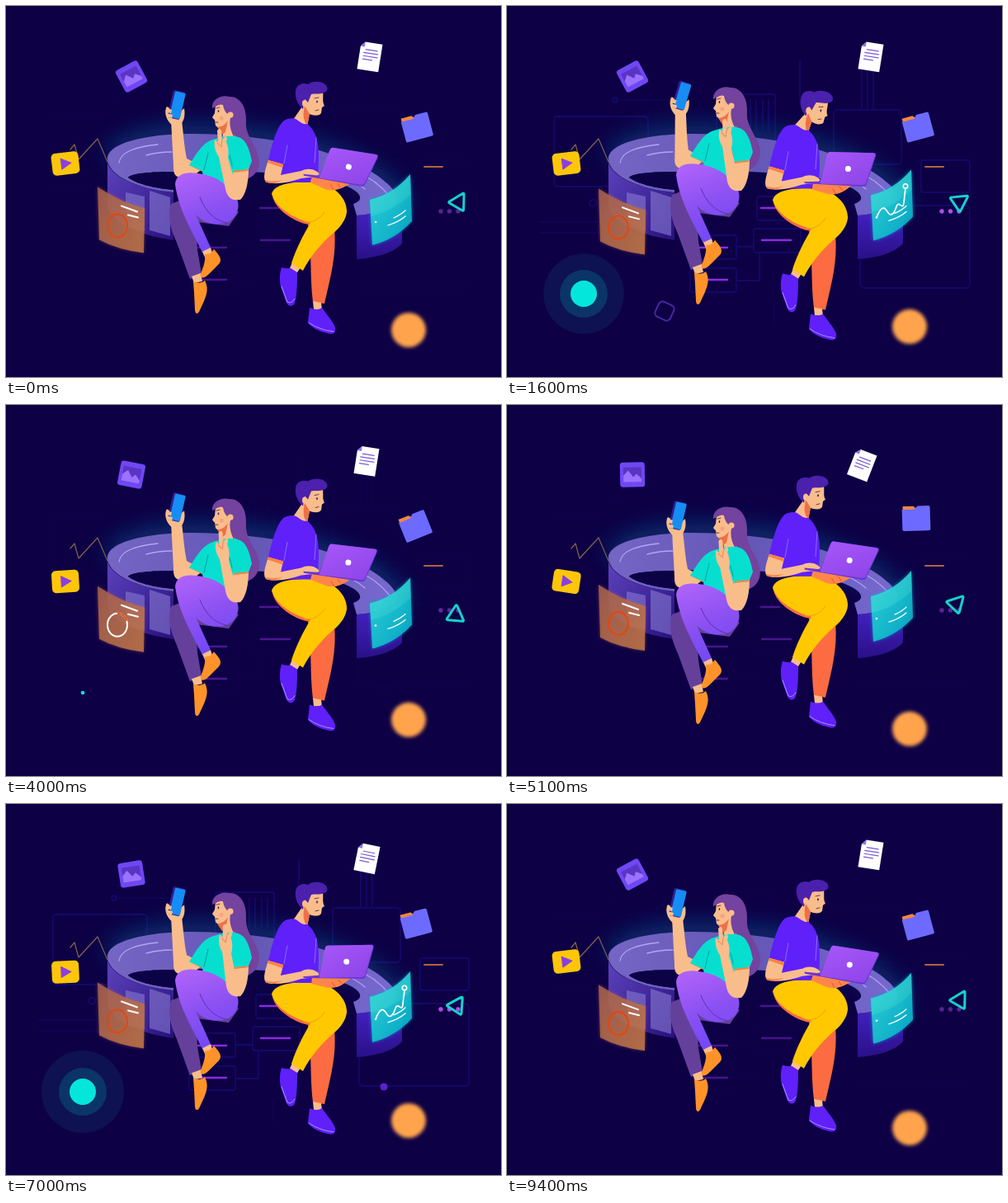
Recreate the animation shown at these times as an HTML page. Size 600 by 450 pixels, loop 9.5 s.

```html
<!DOCTYPE html>
<html lang="en">
<head>
<meta charset="utf-8">
<style>
html, body { margin: 0; height: 100%; overflow: hidden; background: #0d0045; }
svg { display: block; width: 100vw; height: 100vh; }
.line { fill: none; stroke-linecap: round; stroke-linejoin: round; }
.skin { fill: #f9bd8c; }
.shoe { fill: #ff9329; }
.boot { fill: #5f20fa; }
</style>
</head>
<body>
<svg viewBox="0 0 600 450">
<defs>
  <linearGradient id="wall" x2="1" y2="1"><stop stop-color="#5c43bd"/><stop offset="1" stop-color="#29107d"/></linearGradient>
  <linearGradient id="wallRight" x2="0" y2="1"><stop stop-color="#4a25d0"/><stop offset="1" stop-color="#2a1088"/></linearGradient>
  <linearGradient id="top"><stop stop-color="#7565c4"/><stop offset=".5" stop-color="#6457b5"/><stop offset="1" stop-color="#7769cf"/></linearGradient>
  <linearGradient id="thigh" x2=".3" y2="1"><stop stop-color="#b364fa"/><stop offset=".6" stop-color="#8a50f2"/><stop offset="1" stop-color="#7449f6"/></linearGradient>
  <linearGradient id="lid" x2="1" y2="1"><stop stop-color="#a857fa"/><stop offset="1" stop-color="#8c44e6"/></linearGradient>
  <linearGradient id="mint" x2="1" y2="1"><stop stop-color="#2fdcd4"/><stop offset="1" stop-color="#04abc6"/></linearGradient>
  <linearGradient id="rust" x2="1" y2="1"><stop stop-color="#a4604f"/><stop offset="1" stop-color="#c27747"/></linearGradient>
  <filter id="soft" x="-50%" y="-50%" width="200%" height="200%"><feGaussianBlur stdDeviation="2"/></filter>
  <filter id="halo" x="-50%" y="-50%" width="200%" height="200%"><feGaussianBlur stdDeviation="14"/></filter>
</defs>
<rect width="600" height="450" fill="#0d0045"/>

<g id="circuit" class="line" stroke="#130868" stroke-width="1.8">
  <rect x="57" y="134" width="114" height="85" rx="4"/>
  <rect x="396" y="126" width="82" height="66" rx="4"/>
  <rect x="428" y="242" width="133" height="100" rx="5"/>
  <rect x="502" y="187" width="59" height="39" rx="3"/>
  <rect x="254" y="107" width="71" height="62" rx="3"/>
  <rect x="303" y="231" width="47" height="29" rx="3"/>
  <rect x="299" y="270" width="57" height="29" rx="3"/>
  <rect x="222" y="278" width="56" height="29" rx="3"/>
  <rect x="222" y="318" width="56" height="29" rx="3"/>
  <path d="M278 333H306V299M278 292H299M430 78V126M437 78V126M444 78V126M355 67V118M295 114V150M302 114V150M310 114V150M317 114V150"/>
  <path d="M131 114H200M40 262H110M40 275H112M324 360V385" opacity=".5"/>
  <circle cx="131" cy="114" r="3"/><circle cx="104" cy="239" r="4"/>
</g>
<g id="bars" class="line" stroke="#8a2be0" stroke-width="2.4">
  <path d="M308 245H330M309 284H344M233 293H267M233 332H267"/>
  <path d="M527 249h0M537.5 249h0M548 249h0" stroke="#b04be8" stroke-width="5.4"/>
</g>
<path class="line" d="M507 195H529" stroke="#b4633e" stroke-width="2"/>
<path class="line" d="M78 174L83 168L88 186L111 161L123 189H141" stroke="#87634c" stroke-width="1.2"/>

<circle id="ringOuter" cx="93" cy="349" fill="#0e1152"/>
<circle id="ringInner" cx="93" cy="349" fill="#0b3468"/>
<circle id="core" cx="93" cy="349" fill="#04e6dc"/>
<circle id="dot" cx="458" cy="343" r="4.5" fill="#5a24c8"/>
<rect id="tile" x="-10" y="-10" width="20" height="20" rx="5" fill="none" stroke="#4c279f" stroke-width="2"/>
<circle id="ball" cx="488" r="21" fill="#ffa44e" filter="url(#soft)"/>

<path class="line" d="M135 178C180 150 240 154 310 162C390 172 455 205 474 236" stroke="#0f5290" stroke-width="24" opacity=".65" filter="url(#halo)"/>
<path d="M123 188C124 206 160 222 203 226V284C160 278 124 262 123 240Z" fill="url(#wall)"/>
<path d="M145 226L168 231V273L145 267ZM174 224L199 232V279L174 272Z" fill="#8273ce" opacity=".65"/>
<path d="M425 254C450 252 478 246 480 234V288C470 300 445 306 425 307Z" fill="url(#wallRight)"/>
<path d="M203 226C160 222 124 206 123 186C122 165 175 155 225 155C330 155 427 181 463 216C488 240 465 250 425 254L421 240C438 234 428 222 398 213C350 202 270 198 205 201C175 201 152 203 148 208C157 215 178 221 203 223Z" fill="url(#top)"/>
<path d="M203 223C178 221 157 215 148 208C152 203 175 201 205 201L340 204V226Z" fill="#0c0347"/>
<path class="line" d="M137 190C139 177 156 171 184 168M170 181C181 178 190 177 201 177M423 200C440 207 453 216 465 231M395 200C410 206 425 213 435 222" stroke="#b4a3f4" stroke-width="1.3"/>

<g id="rustPanel">
  <path d="M111 219Q140 238 168 245L167 299Q135 295 113 283Z" fill="#c06b45" opacity=".45" filter="url(#soft)"/>
  <path d="M111 219Q140 238 168 245L167 299Q135 295 113 283Z" fill="url(#rust)" opacity=".85"/>
  <g class="line" stroke="#fff" stroke-width="2">
    <path d="M140 242L159 249M148 253L160 256"/>
    <ellipse id="dialBase" cx="135" cy="266" rx="12" ry="14"/>
    <path id="dial" d="M135 252A12 14 0 0 1 135 280A12 14 0 0 1 135 252" pathLength="1" stroke="#e2470f" stroke-linecap="butt"/>
  </g>
</g>

<g id="woman">
  <path d="M262 112C281 104 292 120 291 140C290 152 296 160 302 172C312 191 306 207 288 211C276 195 270 165 268 145Z" fill="#74429f"/>
  <path d="M200 240C195 256 200 271 207 287L223 331L237 325L232 296C231 278 231 266 232 262L270 267L282 250L240 225Z" fill="#65409b"/>
  <path class="skin" d="M225 328L236 324L238 334L228 336Z"/>
  <path class="shoe" d="M227 334Q236 338 241 333C246 343 243 350 240 358L234 371C231 375 229 372 229 368L228 348Z"/>
  <path class="skin" d="M254 120L253 130L250 135Q252 138 253 138L254 145Q257 149 263 147V160L278 161V128L270 114Z"/>
  <path d="M256 147Q265 146 269 139L266 153L262 156Z" fill="#ee7047"/>
  <path d="M250 124C249 114 260 107 271 110C284 112 288 128 280 146L277 160C271 150 270 140 273 133C267 132 264 126 263 120C259 118 255 122 250 124Z" fill="#74429f"/>
  <circle class="skin" cx="272" cy="132" r="3.6"/>
  <ellipse cx="257.5" cy="127.5" rx=".8" ry="1.5" fill="#35205a"/>
  <path class="line" d="M255 124L259 123M254 141L257 141" stroke="#693b55"/>
  <circle cx="261" cy="136" r="2.5" fill="#f78f78" opacity=".6"/>
  <g id="phoneArm">
    <path class="skin" d="M200 138L213 138C215 155 216 171 219 185L229 190L236 199C228 206 218 211 210 208C203 206 203 200 203 194Z"/>
    <path class="skin" d="M195 122C191 128 194 139 202 145L212 143C217 138 217 130 216 124L209 130Z"/>
    <g transform="rotate(13 207 120)"><rect x="199" y="103" width="15" height="34" rx="2" fill="#302092"/><rect x="201.5" y="104" width="13" height="32" rx="1.5" fill="#168df5"/></g>
    <path class="skin" d="M194 123L201 126L200 130L194 129ZM195 130L202 132L201 136L196 135Z"/>
  </g>
  <path d="M222 193L238 201L239 195L226 190Z" fill="#ff8140"/>
  <path d="M248 163C256 160 268 157 278 158C289 160 294 168 298 188L293 198L278 198L277 226L240 220L238 200L222 193C230 180 238 167 248 163Z" fill="#06dfcf"/>
  <path class="line" d="M240 199L245 178M275 197L271 181" stroke="#0a9aa4"/>
  <path d="M205 216C206 203 220 201 232 203C252 205 266 214 278 230C287 244 278 262 262 264C248 266 237 261 230 253L248 293L238 299C228 278 209 248 205 216Z" fill="url(#thigh)"/>
  <path class="line" d="M235 232C242 250 253 260 267 263" stroke="#5934ad"/>
  <path class="skin" d="M238 298L248 293L251 302L242 307Z"/>
  <path class="shoe" d="M241 301Q248 302 252 295C260 304 262 308 258 313L246 325C240 331 235 331 236 325C240 315 242 308 241 301Z"/>
  <path class="skin" d="M276 198H294C294 213 291 229 284 235C276 236 269 231 267 222L275 205Z"/>
  <path d="M276 202L293 200L297 190L276 196Z" fill="#ff8140"/>
  <path d="M274 194L298 188L294 198L275 200Z" fill="#06dfcf"/>
  <g id="foreArm">
    <path class="skin" d="M284 234C275 238 268 232 266 222L258 183C253 176 252 169 253 162L257 165L256 151Q259 147 261 151L262 162L266 158Q269 158 267 165C270 172 270 178 269 184L276 208Z"/>
    <path class="line" d="M262 162L261 171M256 166L260 170" stroke="#e58559"/>
  </g>
</g>

<g id="man">
  <path d="M323 230C325 246 349 262 366 265C371 295 368 327 372 359L386 361C393 330 401 303 398 270L378 242Z" fill="#fc6b41"/>
  <path class="skin" d="M372 358L382 360L383 368H373ZM347 311L357 317L352 325L344 318Z"/>
  <path class="boot" d="M368 366Q377 370 383 366C390 376 396 382 399 390C400 397 396 399 390 397C380 395 370 390 366 384Z"/>
  <path class="boot" d="M334 317Q340 319 345 318L353 323C353 335 353 350 350 360C347 366 342 364 340 360L333 340C331 332 332 323 334 317Z"/>
  <path class="line" d="M367 384Q380 393 397 395M334 340L341 359Q346 362 350 355" stroke="#a990ff"/>
  <path d="M322 228C325 215 350 212 378 214C400 218 414 235 413 250C412 260 404 270 396 276C380 290 368 305 360 321L346 312C352 294 360 278 369 263C350 258 328 246 322 228Z" fill="#ffc800"/>
  <path class="line" d="M386 250C379 260 371 263 362 262" stroke="#e9a300"/>
  <g id="manHead">
    <path class="skin" d="M360 108L384 104C385 112 383 116 386 121L383 123L382 130C379 134 372 133 368 131L365 146Q355 145 348 138L359 122Z"/>
    <path d="M362 121L368 131L365 145Q358 137 362 121Z" fill="#ee7047"/>
    <path d="M351 104C351 97 358 92 366 95C372 90 386 91 389 98C391 103 387 105 383 106C378 107 374 106 370 107L366 117L362 113L360 125C354 120 350 112 351 104Z" fill="#4b20ad"/>
    <ellipse class="skin" cx="362" cy="118" rx="3" ry="4"/>
    <ellipse cx="377" cy="116" rx=".9" ry="1.6" fill="#35205a"/>
    <path class="line" d="M374 112L379 111M375 127L379 126" stroke="#693b55"/>
  </g>
  <path d="M337 139C342 136 350 135 354 139Q360 144 365 143C374 150 380 162 379 187L378 214H331L336 192L318 187C323 165 329 145 337 139Z" fill="#5f20fa"/>
  <path class="line" d="M337 191L341 169M376 160L374 190" stroke="#8d6cff"/>
  <path class="skin" d="M318 187L336 192L333 205L358 200C367 195 377 199 380 204C375 208 366 208 358 209C343 214 327 217 316 214C310 210 315 196 318 187Z"/>
  <path d="M318 187L336 192L335 196L317 190ZM313 210Q320 215 336 211L326 215L316 214Z" fill="#ff8140"/>
  <g id="laptop">
    <path d="M371 207L419 208C409 217 400 222 389 220L370 215Z" fill="#ff864b"/>
    <path class="line" d="M395 214L399 219M403 211L407 215" stroke="#e45d33"/>
    <path d="M391 169H444Q447 169 446 173L436 207Q435 210 432 210L361 208L360 206L379 205L388 173Q389 169 391 169Z" fill="#6d35d2"/>
    <path d="M390 169H443Q446 169 445 173L435 206Q434 208 431 208H382Q379 208 380 205L387 173Q388 169 390 169Z" fill="url(#lid)"/>
    <circle cx="413" cy="189" r="3.5" fill="#fff"/>
  </g>
</g>

<g id="mintPanel">
  <path d="M441 237Q470 230 490 206L492 263Q472 285 444 292Z" fill="#00a7d7" opacity=".65" filter="url(#soft)"/>
  <path d="M441 237Q470 230 490 206L492 263Q472 285 444 292Z" fill="url(#mint)" opacity=".88"/>
  <path d="M441 237Q470 230 490 206L491 230Q468 252 442 257Z" fill="#6ef0df" opacity=".18"/>
  <g class="line" stroke="#fff" stroke-width="1.7">
    <path d="M470 259Q479 255 484 250M463 268Q476 264 484 257" stroke-width="1.3"/>
    <path id="graph" d="M448 264C453 251 457 250 461 257S469 260 472 251S480 257 481 246L483 229" pathLength="1"/>
    <circle id="graphEnd" cx="483" cy="226" r="2.7"/>
  </g>
  <circle cx="448" cy="264" r="1.3" fill="#fff"/>
</g>

<g id="picture">
  <rect x="-15" y="-15" width="30" height="30" rx="3.5" fill="#7047f5"/>
  <path d="M-11 -9H11V9H-11Z" fill="#5a35c4"/>
  <path d="M-11 9V1L-5 -5L1 3L5 -1L11 5V9Z" fill="#9a72ff"/>
</g>
<g id="video">
  <rect x="-16.5" y="-13.5" width="33" height="27" rx="5" fill="#fec609"/>
  <path d="M-5 -6.500L7 0L-5 6.500Z" fill="#893fe1" stroke="#893fe1" stroke-linejoin="round"/>
</g>
<g id="sheet">
  <path d="M-8 -17H13V17H-13V-11Z" fill="#fff"/><path d="M-8 -17V-11H-13Z" fill="#9170ec"/>
  <path class="line" d="M-6 -8H8M-8 -4H9M-8 0H9M-8 4H3" stroke="#7959d5" stroke-width="1.2"/>
</g>
<g id="folder">
  <path d="M-16 -15H-3L0 -12H13V0H-16Z" fill="#f7863e"/>
  <path d="M-17 -11H-2L2 -15H15Q17 -15 17 -13V13Q17 15 15 15H-15Q-17 15 -17 13Z" fill="#6d6bff"/>
</g>
<path id="triangle" class="line" d="M-1 -10.500Q0 -12 1 -10.500L10 6Q10.500 7.500 9 7.500H-9Q-10.500 7.500 -10 6Z" stroke="#15d2ce" stroke-width="3"/>
</svg>
<script>
const LOOP = 9.5;
const { PI, sin, cos, min, max } = Math;
const el = id => document.getElementById(id);
const set = (id, attrs) => { for (const k in attrs) el(id).setAttribute(k, attrs[k]); };
const place = (id, x, y, turn = 0) => set(id, { transform: `translate(${x} ${y}) rotate(${turn})` });
const spin = (id, angle, x, y) => set(id, { transform: `rotate(${angle} ${x} ${y})` });

// Eased 0 to 1 between two times; a smooth hump; an appearance that repeats once.
const rise = (t, from, to) => (1 - cos(PI * min(1, max(0, (t - from) / (to - from))))) / 2;
const bump = (t, from, to) => rise(t, from, (from + to) / 2) - rise(t, (from + to) / 2, to);
const show = (t, start, ramp, end) => rise(t, start, start + ramp) - rise(t, end, end + ramp);
const twice = (t, start, ramp, end, gap = 5) => show(t, start, ramp, end) + show(t - gap, start, ramp, end);

function drawPeople(t, a) {
  const look = bump(t, .5, 2.7);
  place('woman', 0, -1 - 8.5 * cos(a - .72) + 7.7 * cos(2 * a - .29));
  spin('phoneArm', 3.5 * look, 212, 200);
  spin('foreArm', 2.5 - 2.5 * cos(2 * a), 279, 230);
  place('man', 0, 1.4 + 4.1 * cos(a - .72) - 4.5 * cos(2 * a));
  spin('manHead', 8 * look, 355, 142);
  spin('laptop', 4 + 5 * cos(2 * a), 375, 207);
}

function drawPanels(t, a) {
  place('mintPanel', 0, -2 - 6.5 * sin(2 * a));
  place('rustPanel', 0, 2.5 * sin(a + .2));
  const graph = twice(t, .5, 1, 2.7, 5.2);
  set('graph', { 'stroke-dasharray': `${graph} 2`, opacity: +(graph > .01) });
  set('graphEnd', { opacity: +(graph > .97) });
  const sweep = t < 3.5 ? 1 : rise(t, 3.6, 5);
  set('dial', { 'stroke-dasharray': `${sweep} 2` });
  set('dialBase', { opacity: +(sweep < 1) });
}

function drawBackground(t) {
  const lit = .12 + .88 * twice(t, 0, 1.1, 3.1);
  set('circuit', { opacity: lit });
  set('bars', { opacity: .4 + .6 * lit });
  set('core', { r: 16 * twice(t, .2, .8, 3.4) });
  set('ringInner', { r: 29 * twice(t, .9, .7, 3.2) });
  set('ringOuter', { r: 50 * twice(t, .7, 1, 3) });
  set('dot', { opacity: twice(t, 1.6, 1, 3.1, 4) });
  set('ball', { cy: 393 - 12 * bump(t % (LOOP / 3), 0, 2) });

  const late = t > 5;
  const drift = late ? t - 7.9 : t - 1.6;
  place('tile', (late ? 265 : 191) + 20 * drift, late ? 378 : 370, (late ? -8 : 25) + 25 * drift);
  set('tile', { opacity: bump(drift, -.9, .9) });
}

// Icons drift off mid-loop, sway there, and return to rest.
function drawIcons(t, a) {
  const away = show(t, 1.6, 1.5, 6.3);
  const sway = sin(1.75 * (t - 3.1));
  place('picture', 152, 85.5 - away, -28 + away * (30 + 9 * sway));
  place('video', 72, 191 + 23 * away, -7 + away * (12.5 - 9 * sway));
  place('sheet', 441 - away * (9 - 5 * sway), 61.5 + away * (10 - 3.5 * sway), 9 + away * (9 - 9 * sway));
  place('folder', 498 - 2 * away, 147 - away * (7 - 7 * sway), -15 + away * (8 - 15 * sway));
  place('triangle', 549 - 4 * away, 237 + away * (7 + 10 * sway), 30 + 30 * sin(2 * a) * (1 - rise(t, 6.3, 7.8)));
}

function tick() {
  const t = Math.floor(performance.now() / 100) / 10 % LOOP;
  const a = 2 * PI * t / LOOP;
  drawBackground(t);
  drawPeople(t, a);
  drawPanels(t, a);
  drawIcons(t, a);
  requestAnimationFrame(tick);
}
tick();
</script>
</body>
</html>
```
